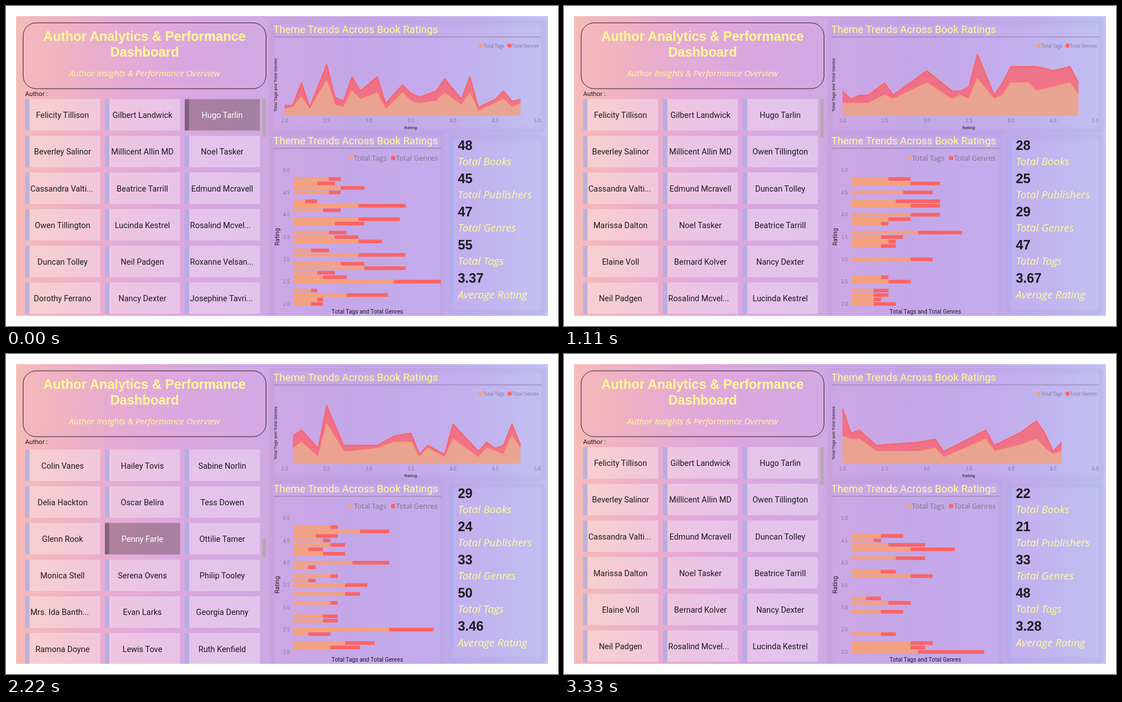
Write an HTML page that moves like this. It is 984 px wide and 569 px high and loops after 4440 ms.

```html
<!DOCTYPE html>
<html lang="en">
<head>
<meta charset="utf-8">
<title>Author dashboard</title>
<style>
html, body { margin: 0; width: 100%; height: 100%; overflow: hidden; background: #fff; }
svg { display: block; width: 984px; height: 569px; }
text { font-family: Roboto, "Noto Sans", sans-serif; fill: #1d1a20; }
.mid { text-anchor: middle; }
.end { text-anchor: end; }
.bold { font: bold 23.5px "Liberation Sans", Arial, sans-serif; }
.ital { font: italic 19px "Open Sans", "Noto Sans", sans-serif; }
.title, .ital, .head { fill: #fffa96; }
.head { font-size: 18.55px; }
.name { font-size: 14.4px; }
.on { fill: #fff; }
.grey { font-family: "Open Sans", "Noto Sans", sans-serif; fill: #7f7487; }
.tick { font-size: 8.6px; }
.panel { fill: rgba(190, 160, 230, .1); }
.rule { stroke: #8d789c; stroke-width: 1; }
.cell { fill: rgba(255, 255, 255, .32); }
.edge { fill: rgba(160, 175, 235, .66); }
.cell.sel { fill: rgba(128, 97, 114, .56); }
.edge.sel { fill: rgba(95, 75, 95, .75); }
.tags { fill: #f5a17b; }
.genres { fill: #fb6364; }
.state { opacity: 0; animation: show 4440ms step-end infinite; }
@keyframes show {
  0% { opacity: 1; }
  25%, 100% { opacity: 0; }
}
</style>
</head>
<body>
<svg id="stage" viewBox="0 0 984 569">
  <defs>
    <linearGradient id="bg" gradientUnits="userSpaceOnUse" x1="18" y1="0" x2="966" y2="0">
      <stop offset="0" stop-color="#f5bbb8"/>
      <stop offset=".09" stop-color="#efb2c2"/>
      <stop offset=".19" stop-color="#e6aad3"/>
      <stop offset=".3" stop-color="#dca7df"/>
      <stop offset=".48" stop-color="#cfa8e3"/>
      <stop offset=".63" stop-color="#c4a8e8"/>
      <stop offset=".77" stop-color="#c4aceb"/>
      <stop offset=".89" stop-color="#c0b7ef"/>
      <stop offset="1" stop-color="#c0c5f2"/>
    </linearGradient>
    <filter id="soft" x="-10%" y="-10%" width="120%" height="120%">
      <feGaussianBlur stdDeviation="3"/>
    </filter>
    <clipPath id="list"><rect x="18" y="164" width="450" height="387"/></clipPath>
    <clipPath id="page"><rect x="18" y="18" width="948" height="533"/></clipPath>
  </defs>
  <rect x="18" y="18" width="948" height="533" fill="url(#bg)"/>
  <g id="base" clip-path="url(#page)"></g>
  <g id="states"></g>
</svg>
<script>
const STEP = 1110;

const first = [
  "Felicity Tillison", "Gilbert Landwick", "Hugo Tarlin",
  "Beverley Salinor", "Millicent Allin MD", "Noel Tasker",
  "Cassandra Valti...", "Beatrice Tarrill", "Edmund Mcravell",
  "Owen Tillington", "Lucinda Kestrel", "Rosalind Mcvel...",
  "Duncan Tolley", "Neil Padgen", "Roxanne Velsan...",
  "Dorothy Ferrano", "Nancy Dexter", "Josephine Tavri..."
];
const second = [
  "Felicity Tillison", "Gilbert Landwick", "Hugo Tarlin",
  "Beverley Salinor", "Millicent Allin MD", "Owen Tillington",
  "Cassandra Valti...", "Edmund Mcravell", "Duncan Tolley",
  "Marissa Dalton", "Noel Tasker", "Beatrice Tarrill",
  "Elaine Voll", "Bernard Kolver", "Nancy Dexter",
  "Neil Padgen", "Rosalind Mcvel...", "Lucinda Kestrel"
];
const third = [
  "Colin Vanes", "Hailey Tovis", "Sabine Norlin",
  "Delia Hackton", "Oscar Belira", "Tess Dowen",
  "Glenn Rook", "Penny Farle", "Ottilie Tamer",
  "Monica Stell", "Serena Ovens", "Philip Tooley",
  "Mrs. Ida Banth...", "Evan Larks", "Georgia Denny",
  "Ramona Doyne", "Lewis Tove", "Ruth Kenfield"
];

// tags and genres hold one count per rating, 2.0 to 4.8 in tenths; 0 means no books
const states = [
  { names: first, sel: 2, top: 165.5, bar: [165, 68], unitX: 10.52, unitY: 3.64,
    stats: ["48", "45", "47", "55", "3.37"],
    tags: [3,4,9,3,0,17,5,4,12,8,0,11,3,0,11,7,6,0,7,11,0,5,11,2,0,6,8,4,6],
    genres: [2,1,7,1,0,8,4,3,7,4,0,8,3,0,4,4,3,0,5,7,0,3,8,2,0,2,4,3,2] },
  { names: second, sel: -1, top: 165.5, bar: [165, 68], unitX: 13.15, unitY: 7.27,
    stats: ["28", "25", "29", "47", "3.67"],
    tags: [3,3,3,3,0,5,4,0,0,0,8,0,0,4,5,4,9,0,4,5,8,0,8,6,0,7,0,8,5],
    genres: [3,1,2,2,0,3,1,0,0,0,3,0,0,2,1,3,6,0,1,3,4,0,4,6,0,4,0,4,3] },
  { names: third, sel: 7, top: 170, bar: [327.5, 34.5], unitX: 13.15, unitY: 5.43,
    stats: ["29", "24", "33", "50", "3.46"],
    tags: [0,5,7,0,2,13,0,4,4,0,0,5,0,7,0,7,2,5,0,2,8,0,4,2,5,4,3,9,5],
    genres: [0,4,4,0,3,6,0,2,2,0,0,1,0,2,0,3,1,1,0,1,5,0,3,2,2,1,3,4,1] },
  { names: second, sel: -1, top: 165.5, bar: [165, 68], unitX: 13.15, unitY: 5.43,
    stats: ["22", "21", "33", "48", "3.28"],
    tags: [9,8,8,0,4,0,0,0,0,4,0,5,2,0,0,0,0,8,4,0,0,6,0,8,5,3,4,0,0],
    genres: [9,2,3,0,2,0,0,0,0,3,0,3,2,0,0,0,0,3,2,0,0,4,0,6,5,1,3,0,0] }
];

const text = (x, y, str, cls, size) =>
  `<text x="${x}" y="${y}" class="${cls}"${size ? ` style="font-size:${size}px"` : ""}>${str}</text>`;
const rect = (x, y, w, h, attrs) =>
  `<rect x="${x}" y="${y}" width="${w}" height="${h}" ${attrs}/>`;
const rule = (x1, x2, y) => `<line class="rule" x1="${x1}" x2="${x2}" y1="${y}" y2="${y}"/>`;
const dot = (x, y, r, cls) => `<circle cx="${x}" cy="${y}" r="${r}" class="${cls}"/>`;
const turned = (x, y, str, size) =>
  `<text transform="translate(${x} ${y}) rotate(-90)" class="mid" style="font-size:${size}px">${str}</text>`;
const panel = (x, y, w, h) =>
  rect(x, y, w, h, 'fill="none" stroke="#8a5fb4" stroke-opacity=".22" stroke-width="4" filter="url(#soft)"') +
  rect(x, y, w, h, 'class="panel"');

function drawBase() {
  const heading = "Theme Trends Across Book Ratings";
  const axis = "Total Tags and Total Genres";
  let out = rect(36, 36, 422, 105, 'rx="20" fill="none" stroke="#f0a8d8" stroke-opacity=".3" stroke-width="6" filter="url(#soft)"') +
    rect(30.5, 30, 433, 117, 'rx="23" fill="none" stroke="#262028"') +
    text(247, 62, "Author Analytics &amp; Performance", "bold title mid") +
    text(247, 89.5, "Dashboard", "bold title mid") +
    text(247, 125, "Author Insights &amp; Performance Overview", "ital mid", 15.2) +
    text(34, 159.5, "Author :", "", 11.6);

  out += panel(474, 28, 484, 194) + panel(474, 229, 304, 330) + panel(791, 233, 167, 312);

  out += text(476.5, 47.5, heading, "head") + rule(477, 954, 55) +
    dot(846, 70.5, 3.8, "tags") + text(851, 73.8, "Total Tags", "grey", 8.2) +
    dot(897.5, 70.5, 3.8, "genres") + text(902, 73.8, "Total Genres", "grey", 8.2) +
    turned(483, 140.5, axis, 7.7) + text(721.5, 218.5, "Rating", "mid", 8);

  out += text(476.5, 246, heading, "head") + rule(477, 776, 253) +
    dot(614.5, 270.5, 4, "tags") + text(620, 275, "Total Tags", "grey", 12.8) +
    dot(690, 270.5, 4, "genres") + text(695, 275, "Total Genres", "grey", 12.8) +
    turned(486.5, 410.5, "Rating", 10.9) + text(644, 547, axis, "mid", 10.3);

  for (let i = 0; i < 7; i++) {
    const label = (2 + i / 2).toFixed(1);
    out += text(496.5 + i * 75.1, 207, label, "grey tick mid") +
      text(506, 533 - i * 39.67, label, "grey tick end");
  }

  out += rect(794, 232, 3.8, 292, 'fill="#a3b0f6"');
  ["Books", "Publishers", "Genres", "Tags"].forEach((word, i) => {
    out += text(805.5, 283 + i * 59.1, "Total " + word, "ital");
  });
  return out + text(805.5, 519.5, "Average Rating", "ital");
}

function drawNames(s) {
  let out = "";
  s.names.forEach((name, i) => {
    const x = 34 + (i % 3) * 142.3;
    const y = s.top + Math.floor(i / 3) * 65.2;
    const sel = i === s.sel;
    const cut = name.endsWith("...");
    out += rect(x, y, 8, 56, `class="edge${sel ? " sel" : ""}"`) +
      rect(x + 8, y, 126, 56, `class="cell${sel ? " sel" : ""}"`) +
      text(x + (cut ? 9.5 : 66.8), y + 33.6, name, "name" + (cut ? "" : " mid") + (sel ? " on" : ""));
  });
  return `<g clip-path="url(#list)">${out}</g>` +
    rect(457, s.bar[0], 6.3, s.bar[1], 'fill="#b5a9b0"');
}

function drawArea(s) {
  const low = [], high = [];
  s.tags.forEach((n, i) => {
    if (!n) return;
    const x = (496.5 + i * 15.02).toFixed(1);
    low.push(`${x},${(195 - n * s.unitY).toFixed(1)}`);
    high.push(`${x},${(195 - (n + s.genres[i]) * s.unitY).toFixed(1)}`);
  });
  const xOf = p => p.split(",")[0];
  const floor = `${xOf(low[low.length - 1])},195 ${xOf(low[0])},195`;
  const line = (pts, color) =>
    `<polyline points="${pts.join(" ")}" fill="none" stroke="${color}" stroke-width="2" stroke-linejoin="round"/>`;
  return `<polygon points="${low.join(" ")} ${floor}" fill="#eea389" fill-opacity=".9"/>` +
    `<polygon points="${high.join(" ")} ${[...low].reverse().join(" ")}" fill="#fb6370" fill-opacity=".8"/>` +
    line(low, "#f4a07c") + line(high, "#fd6263");
}

function drawBars(s) {
  return s.tags.map((n, i) => {
    if (!n) return "";
    const y = 526.6 - i * 7.935, w = n * s.unitX;
    return rect(512.5, y, w, 6.4, 'class="tags"') +
      rect(512.5 + w, y, s.genres[i] * s.unitX, 6.4, 'class="genres"');
  }).join("");
}

const drawStats = s => s.stats.map((n, i) => text(805.5, 256 + i * 59.1, n, "bold")).join("");

document.getElementById("base").innerHTML = drawBase();
document.getElementById("states").innerHTML = states.map((s, k) =>
  `<g class="state" style="animation-delay:${(k - states.length) * STEP}ms">` +
  drawNames(s) + drawArea(s) + drawBars(s) + drawStats(s) + "</g>").join("");
</script>
</body>
</html>
```
